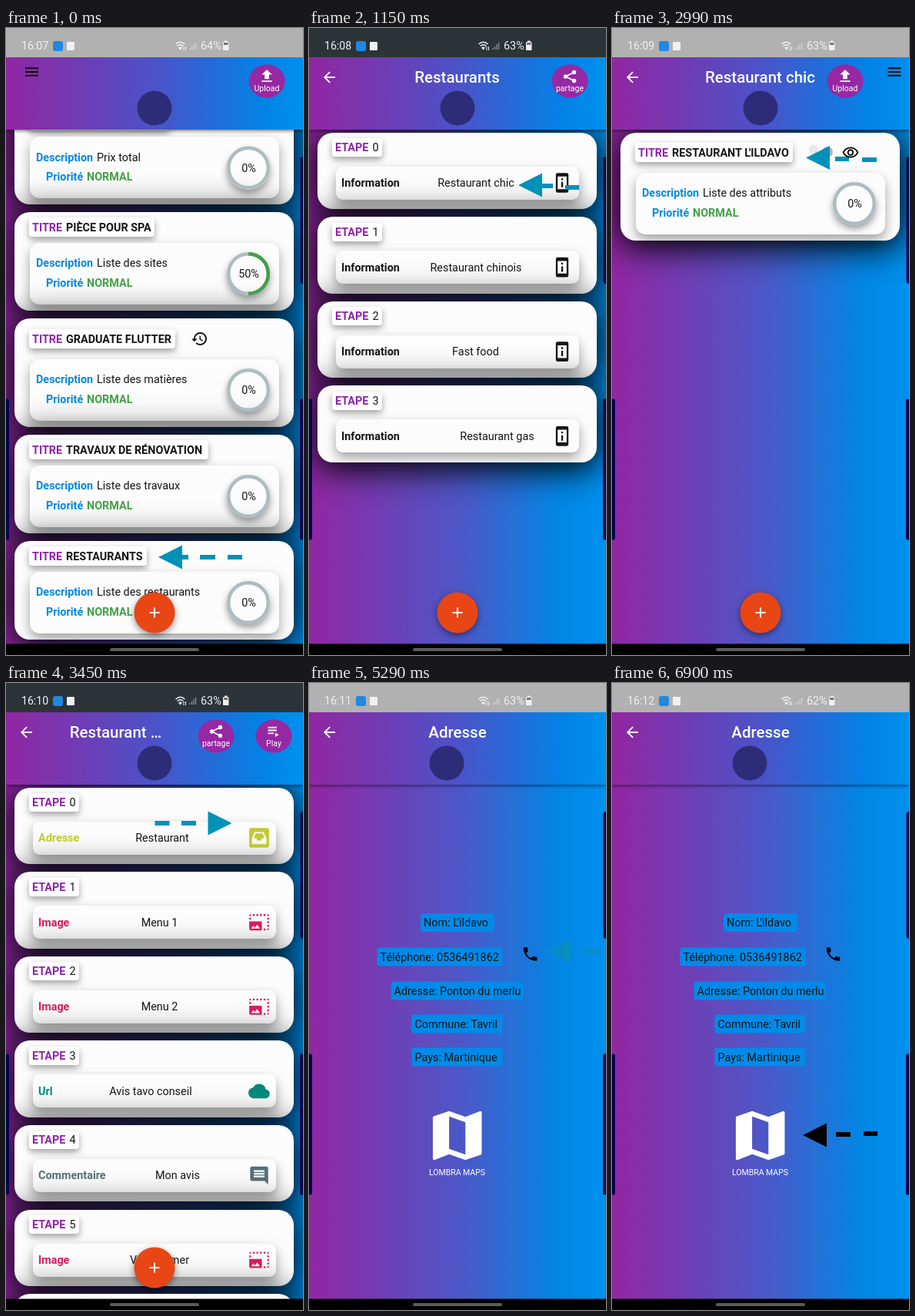
Recreate the animation shown at these times as an HTML page. Size 386x814 px, loop 8000 ms.

```html
<!DOCTYPE html>
<html lang="fr">
<head>
<meta charset="utf-8">
<title>Listes</title>
<style>
html, body { margin: 0; width: 100%; height: 100%; overflow: hidden; background: #000; }
.scene { position: absolute; left: 0; top: 0; width: 386px; height: 814px; overflow: hidden; visibility: hidden;
  background: linear-gradient(90deg, #9226a2, #4c58c8 52%, #0286e4 84%, #0090ee); }
.scene.black { background: #000; }
.scene div { position: absolute; box-sizing: border-box; }
.card { left: 11px; width: 363px; border-radius: 20px; background: #fcfcfc; box-shadow: 0 5px 44px 4px #000; }
.panel { border-radius: 13px; background: #fcfcfc; box-shadow: 0 7px 15px rgba(0,0,0,.36); }
.chip { left: 19px; border-radius: 4px; background: #fff; box-shadow: 0 4px 8px rgba(0,0,0,.36); }
.bar { left: 0; top: 38px; width: 386px; height: 94px; box-shadow: 0 2px 4px rgba(0,0,0,.45);
  background: linear-gradient(90deg, #9226a2, #4c52c8 50%, #0282e6 86%, #0090ee); }
.ring { left: 276px; width: 56px; height: 56px; border-radius: 50%; background: #fcfcfc; box-shadow: 0 5px 10px rgba(0,0,0,.38); }
svg { position: absolute; left: 0; top: 0; }
text { font-family: Roboto, sans-serif; white-space: pre; }
.dial { font-family: Lato, sans-serif; font-weight: 300; stroke: #fff; stroke-width: .4px; }
</style>
</head>
<body>
<script>
const PURPLE = '#8e24aa', BLUE = '#0288e0', GREEN = '#43a047', INK = '#151515', TEAL = '#0091b8', PINK = '#d81b60';

// Icons on a 24 unit grid
const ICON = {
  back: 'M20 11H7.83l5.59-5.59L12 4l-8 8 8 8 1.41-1.41L7.83 13H20z',
  upload: 'M5 20h14v-2H5zM5 10h4v6h6v-6h4l-7-7z',
  play: 'M4 10h12v2H4zm0-4h12v2H4zm0 8h8v2H4zm10 0v6l5-3z',
  menu: 'M3 18h18v-2H3zm0-5h18v-2H3zm0-7v2h18V6z',
  plus: 'M19 13h-6v6h-2v-6H5v-2h6V5h2v6h6z',
  history: 'M13 3a9 9 0 0 0-9 9H1l3.9 4L9 12H6a7 7 0 1 1 2.06 4.94l-1.42 1.42A9 9 0 1 0 13 3zm-1 5v5l4.28 2.54.72-1.21-3.5-2.08V8z',
  info: 'M13 7h-2v2h2zm0 4h-2v6h2zm4-10H7a2 2 0 0 0-2 2v18a2 2 0 0 0 2 2h10a2 2 0 0 0 2-2V3a2 2 0 0 0-2-2zm0 18H7V5h10z',
  image: 'M21 15h2v2h-2zm0-4h2v2h-2zm2 8h-2v2q2 0 2-2zM13 3h2v2h-2zm8 4h2v2h-2zm0-4v2h2q0-2-2-2zM1 7h2v2H1zm16-4h2v2h-2zm0 16h2v2h-2zM3 3Q1 3 1 5h2zm6 0h2v2H9zM5 3h2v2H5zm-4 8v8a2 2 0 0 0 2 2h12V11zm2 8l2.5-3.2 1.8 2.1 2.5-3.2L13 19z',
  cloud: 'M19.35 10.04A7.5 7.5 0 0 0 5.35 8.04 6 6 0 0 0 6 20h13a5 5 0 0 0 .35-9.96z',
  comment: 'M22 4a2 2 0 0 0-2-2H4a2 2 0 0 0-2 2v12a2 2 0 0 0 2 2h14l4 4zM18 14H6v-2h12zm0-3H6V9h12zm0-3H6V6h12z',
  eye: 'M12 4C7 4 2.7 7.1 1 11.5 2.7 15.9 7 19 12 19s9.3-3.1 11-7.5C21.3 7.1 17 4 12 4zm0 2c3.8 0 7.2 2.1 8.8 5.5-1.6 3.4-5 5.5-8.8 5.5s-7.2-2.1-8.8-5.5C4.8 8.1 8.2 6 12 6zm0 1a4.5 4.5 0 1 0 .01 0zm0 2a2.5 2.5 0 1 1-.01 0z',
  phone: 'M6.62 10.79a15 15 0 0 0 6.59 6.59l2.2-2.2a1 1 0 0 1 1.02-.24 11 11 0 0 0 3.57.57 1 1 0 0 1 1 1V20a1 1 0 0 1-1 1A17 17 0 0 1 3 4a1 1 0 0 1 1-1h3.5a1 1 0 0 1 1 1 11 11 0 0 0 .57 3.57 1 1 0 0 1-.25 1.02z',
  map: 'M20.5 3L15 5.1 9 3 3.36 4.9A.5.5 0 0 0 3 5.4V20.5a.5.5 0 0 0 .66.47L9 18.9l6 2.1 5.64-1.9a.5.5 0 0 0 .36-.48V3.5a.5.5 0 0 0-.5-.5zM15 19l-6-2.1V5l6 2.1z',
  tray: 'M3 1h18a2 2 0 0 1 2 2v18a2 2 0 0 1-2 2H3a2 2 0 0 1-2-2V3a2 2 0 0 1 2-2zM7 5.500L4 12.500V19H20V12.500L17 5.500zM8.200 7H15.800L18 12.500H15L14 15H10L9 12.500H6z'
};

const box = (cls, y, h, css = '', inner = '') => `<div class="${cls}" style="top:${y}px;height:${h}px;${css}">${inner}</div>`;
const rect = (x, y, w, h, fill, rx = 0, more = '') => `<rect x="${x}" y="${y}" width="${w}" height="${h}" fill="${fill}" rx="${rx}" ${more}/>`;
const circle = (x, y, r, fill, more = '') => `<circle cx="${x}" cy="${y}" r="${r}" fill="${fill}" ${more}/>`;
const line = (d, color, w = 2, more = '') => `<path d="${d}" fill="none" stroke="${color}" stroke-width="${w}" ${more}/>`;
const text = (x, y, s, { size = 14.4, color = INK, weight = 400, mid = false, cls = '' } = {}) =>
  `<text x="${x}" y="${y}" font-size="${size}" fill="${color}" font-weight="${weight}" class="${cls}"${mid ? ' text-anchor="middle"' : ''}>${s}</text>`;
const icon = (name, x, y, color, k = .94) =>
  `<path d="${ICON[name]}" fill="${color}" fill-rule="evenodd" transform="translate(${x - 12 * k} ${y - 12 * k}) scale(${k})"/>`;
const bold = color => ({ weight: 700, color });

function share(x, y) {
  return line(`M${x + 5.5} ${y - 5.5}L${x - 5.5} ${y}L${x + 5.5} ${y + 5.5}`, '#fff', 1.8) +
    [[5.5, -5.5], [-5.5, 0], [5.5, 5.5]].map(([a, b]) => circle(x + a, y + b, 2.7, '#fff')).join('');
}

function roundButton(x, name, label) {
  return `<ellipse cx="${x}" cy="69" rx="23.5" ry="21.7" fill="#9628a4"/>` +
    (name === 'share' ? share(x, 63) : icon(name, x, 62.5, '#fff')) +
    text(x, 81.5, label, { size: 10.5, color: '#fff', mid: true });
}

// Arrow head at (x, y) pointing in direction dir, followed by dashes [x, y, width]
function arrow(x, y, dir, dashes, color = TEAL, opacity = 1) {
  const b = x - dir * 31;
  return `<g opacity="${opacity}"><path d="M${x} ${y}L${b} ${y - 15.5}V${y + 15.5}z" fill="${color}"/>` +
    dashes.map(([a, c, w]) => rect(a, c - 3, w, 6, color)).join('') + '</g>';
}

function status(time, charge, bg) {
  const c = '#f0f0f0';
  return rect(0, 0, 386, 38, bg) + text(20, 28, time, { color: c, size: 14.1 }) +
    rect(61, 17, 13, 13, '#1e88e5', 3) + rect(79, 18, 10, 11, c, 1) +
    line('M220.5 21Q226.5 15.5 232.5 21M222.5 23.5Q226.5 20 230.5 23.5', c, 1.4) +
    `<path d="M224 25.5Q226.5 23.5 229 25.5L226.5 28.5z" fill="${c}"/>` +
    line('M231 24v5M233.5 24v5', c, 1) +
    line('M239 28v-2M241.5 28v-4M244 28v-7M246.5 28v-9', c, 1.3, 'opacity=".5"') +
    text(253, 28, charge + '%', { color: c }) +
    rect(282, 18, 7.5, 11, c, 1) + rect(284, 16.5, 3.5, 2, c) + rect(283, 19, 5.5, 3, '#777');
}

const edges = (line = 'none') => {
  const more = `stroke="${line}"`;
  return rect(382.5, 167, 8, 165, '#00064e', 4, more) + rect(-4, 481.5, 8, 183, '#00064e', 2, more) + rect(382, 481.5, 8, 183, '#00064e', 2, more);
};
const nav = () => rect(0, 799.5, 386, 15, '#000') + rect(135, 805, 116, 4, '#5c5c5c', 2);
const logo = x => circle(x, 104, 22.5, '#2d2c78');
const title = (x, s) => text(x, 71, s, { size: 20.5, weight: 500, color: '#fff', mid: true });
const back = () => icon('back', 26.5, 64, '#fff');
const fab = () => circle(193, 759, 26.5, '#e84615', 'style="filter:drop-shadow(0 3px 4px rgba(0,0,0,.45))"') + icon('plus', 193, 759, '#fff');

// Task card: y and h of the card, p top of the inner panel, chip width and top
function task(y, h, p, chipY, chipW, name, desc, half) {
  const cy = p + 40.5;
  const html = box('card', y, h, '',
    box('chip', chipY - y, 25, `width:${chipW}px`) +
    box('panel', p - y, 80, 'left:20px;width:324px') + box('ring', cy - 28 - y, 56));
  const svg = text(34, chipY + 17.5, 'TITRE', bold(PURPLE)) + text(78, chipY + 17.5, name, bold(INK)) +
    text(39, p + 31.5, 'Description', bold(BLUE)) + text(118, p + 31.5, desc) +
    text(52, p + 57, 'Priorité', bold(BLUE)) + text(105, p + 57, 'NORMAL', bold(GREEN)) +
    circle(315, cy, 25.8, 'none', 'stroke="#adbcc1" stroke-width="4.5"') +
    (half ? line(`M315 ${cy - 25.8}a25.8 25.8 0 0 1 0 51.6`, GREEN, 4.5) : '') +
    text(315.5, cy + 5, half ? '50%' : '0%', { mid: true });
  return [html, svg];
}

// Step card number i: [label, colour, value, value centre, icon]
function step([label, color, value, x, name], i) {
  const y = 135.5 + i * 109.6;
  const html = box('card', y, 99.5, '',
    box('chip', 7.5, 24, 'width:65px') + box('panel', 44, 43, 'left:24px;width:316px;border-radius:9px'));
  const svg = text(34, y + 24.5, 'ETAPE', bold(PURPLE)) + text(82.5, y + 24.5, i) +
    text(42, y + 70.5, label, bold(color)) + text(x, y + 70.5, value, { mid: true }) +
    icon(name, 329, y + 65.5, color, 1.17);
  return [html, svg];
}

// Card contents are clipped to the area below the app bar
function page(cards, bg, time, charge, top, over) {
  return [cards.map(c => c[0]).join('') + '<div class="bar"></div>',
    `<g style="clip-path:polygon(0 132px,386px 132px,386px 814px,0 814px);clip-path:view-box polygon(0 132px,386px 132px,386px 814px,0 814px)">${cards.map(c => c[1]).join('')}</g>` +
    status(time, charge, bg) + top + edges() + over + nav()];
}

const DARK = '#2c3438', GREY = '#b1b1b1';

function address(time, charge, over) {
  const rows = [[145, 299, 96, "Nom: L'ildavo"], [88.5, 343.5, 163, 'Téléphone: 0536491862'], [106.5, 387.5, 172, 'Adresse: Ponton du merlu'],
    [133.5, 430.5, 118, 'Commune: Tavril'], [133.5, 473.5, 118, 'Pays: Martinique']];
  return page([], GREY, time, charge, back() + title(193, 'Adresse') + logo(179),
    rows.map(([x, y, w, s]) => rect(x, y, w, 24, '#028ae8', 4) + text(x + 4, y + 17, s)).join('') +
    icon('phone', 287.5, 352, '#050505', .98) + icon('map', 192.7, 587.5, '#fff', 3.53) +
    text(192.5, 638.5, 'LOMBRA MAPS', { size: 10.5, color: '#fff', mid: true }) + over);
}

function dialer() {
  const keys = [['1', ''], ['2', 'ABC'], ['3', 'DEF'], ['4', 'GHI'], ['5', 'JKL'], ['6', 'MNO'], ['7', 'PQRS'], ['8', 'TUV'], ['9', 'WXYZ'], ['', ''], ['0', '+']];
  const W = '#fff', DIM = '#686868', big = size => ({ size, color: W, weight: 300, mid: true, cls: 'dial' });
  const pad = keys.map(([k, sub], i) => {
    const x = 83.5 + i % 3 * 109.2, r = Math.floor(i / 3), y = [390, 466, 542.5, 615][r];
    return text(x, y, k, big(32.5)) + text(x, y + (r === 3 ? 19 : 13.5), sub, { size: r === 3 ? 15 : 11, color: DIM, mid: true });
  }).join('');
  const loop = x => circle(x, 399, 3.2, 'none', `stroke="${DIM}"`);
  return ['', status('16:11', '62', '#000') + text(23.3, 91.5, 'Téléphone', { size: 21.3, weight: 500, color: W }) +
    line('M271.5 83h17M280 74.5v17', W, 1.6) + circle(319.5, 82, 6.2, 'none', 'stroke="#fff" stroke-width="1.6"') + line('M324 86.5l5 5', W, 1.6) +
    [77, 83, 89].map(y => circle(355, y, 1.7, W)).join('') +
    text(193, 308.5, '0536491862', big(36.2)) + rect(296.7, 271, 2.4, 48, '#0b70d4') + pad +
    loop(79.5) + loop(87.5) + line('M79.5 402.2h8', DIM, 1) +
    line('M79 592l10 21M89 592l-10 21M76.5 602.5h15', W, 1.7) +
    line('M300 594l-3 17M307 594l-3 17M294.5 599.5h16M293.5 606h16', W, 1.5) +
    circle(83.5, 696, 13, '#74a3f0') + circle(192.7, 696, 30.5, '#00aa62') + icon('phone', 192.7, 696, W, 1.5) +
    `<path d="M288.5 696L295 688Q296 686.5 298 686.5H312.5Q315.5 686.5 315.5 689.5V702.5Q315.5 705.5 312.5 705.5H298Q296 705.5 295 704z" fill="${W}"/>` +
    line('M300 692l8 8M308 692l-8 8', '#000', 2.2) + edges('#1c2a78') + nav(), 'black'];
}

const info = (value, x) => ['Information', INK, value, x, 'info'];
const image = value => ['Image', PINK, value, 199.5, 'image'];

const scenes = [
  page([
    task(101, 128, 141, 108, 183, '', 'Prix total'),
    task(239, 128, 278.5, 246, 163, 'PIÈCE POUR SPA', 'Liste des sites', true),
    task(377, 141, 429.5, 391, 190, 'GRADUATE FLUTTER', 'Liste des matières'),
    task(528, 128, 567.5, 535, 233, 'TRAVAUX DE RÉNOVATION', 'Liste des travaux'),
    task(666, 127.5, 705.5, 673, 153, 'RESTAURANTS', 'Liste des restaurants')
  ], GREY, '16:07', '64', icon('menu', 33.5, 57, '#080808') + logo(193) + roundButton(339, 'upload', 'Upload'),
  icon('history', 251.5, 403.5, '#080808') + arrow(198, 687, -1, [[228, 687, 9], [252, 687, 20], [288, 687, 19]]) + fab()),

  page([info('Restaurant chic', 217), info('Restaurant chinois', 217), info('Fast food', 216.5), info('Restaurant gas', 244.5)].map(step),
    DARK, '16:08', '63', back() + title(192.5, 'Restaurants') + logo(193) + roundButton(339, 'share', 'partage'),
    arrow(272, 204, -1, [[302, 205, 15], [333, 207, 18]]) + fab()),

  page([task(135.5, 140.5, 187.5, 149, 205, "RESTAURANT L'ILDAVO", 'Liste des attributs')],
    GREY, '16:09', '63', back() + title(192.5, 'Restaurant chic') + logo(193) + roundButton(303, 'upload', 'Upload') + icon('menu', 367, 57, '#080808'),
    circle(262, 158, 6, '#e8e8e8') + circle(280, 161, 7, '#b4b4b4') +
    arrow(252, 168.5, -1, [[290, 170, 18], [325, 171, 19]]) + icon('eye', 310, 162, '#080808') + fab()),

  page([['Adresse', '#c0ca33', 'Restaurant', 203, 'tray'], image('Menu 1'), image('Menu 2'), ['Url', '#00897b', 'Avis tavo conseil', 188, 'cloud'],
    ['Commentaire', '#546e7a', 'Mon avis', 223, 'comment'], image('Vue sur mer'), image('')].map(step),
    DARK, '16:10', '63', back() + title(142.5, 'Restaurant …') + logo(193) + roundButton(273, 'share', 'partage') + roundButton(348, 'play', 'Play'),
    arrow(293.5, 182, 1, [[193.5, 182, 19], [228, 182, 19]]) + fab()),

  address('16:11', '63', arrow(309.5, 348.5, -1, [[357, 348, 19]], '#0c8fb6', .75)),
  dialer(),
  address('16:12', '62', arrow(248, 587, -1, [[291, 586, 19], [327, 585, 18]], '#000'))
];

const views = scenes.map(([html, svg, cls = '']) => {
  const el = document.createElement('div');
  el.className = 'scene ' + cls;
  el.innerHTML = html + `<svg width="386" height="814" viewBox="0 0 386 814">${svg}</svg>`;
  document.body.append(el);
  return el;
});

const LOOP = 8000, HOLD = 1150;
const start = performance.now();
function tick() {
  const t = (performance.now() - start) % LOOP;
  const now = Math.min(views.length - 1, Math.floor(t / HOLD));
  views.forEach((v, i) => v.style.visibility = i === now ? 'visible' : 'hidden');
  requestAnimationFrame(tick);
}
tick();
</script>
</body>
</html>
```
